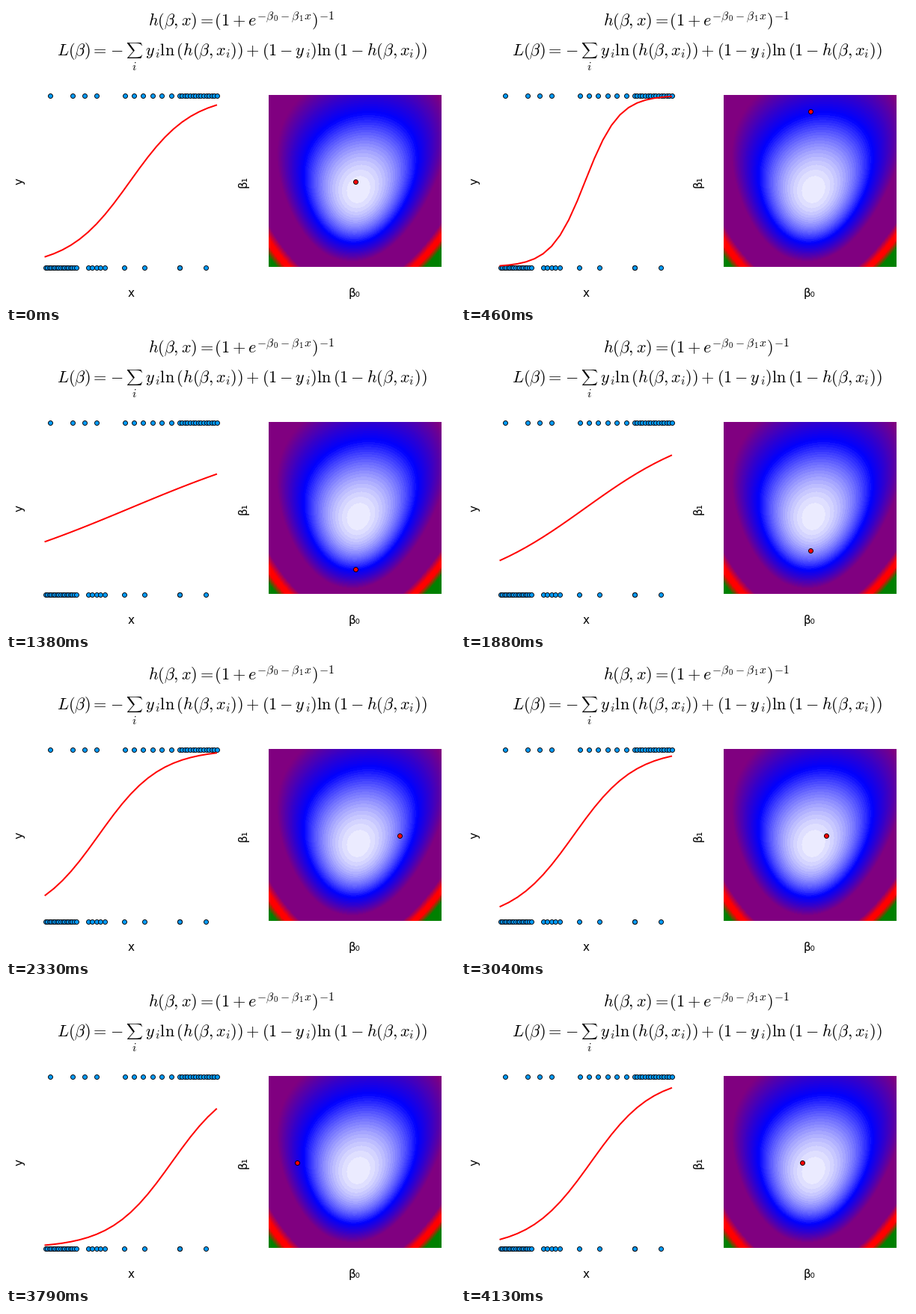
Animation of 600 by 400 pixels, one loop 4.18 s. Source, as a matplotlib script:

```python
import numpy as np
import matplotlib.pyplot as plt
from matplotlib.animation import FuncAnimation

W, H, DPI = 600, 400, 100
LOOP, TICK, FPS, STEPS = 4180, 20, 24, 100
PT = 72 / DPI  # points per pixel

# Left panel: y = 1 at TOP, y = 0 at BOTTOM
TOP, BOTTOM = 119.5, 349
X_LEFT, X_RIGHT, X_ZERO, X_SPAN = 52.5, 281, 166, 229

# Right panel: intercept across, slope upwards
HEAT = (351, 582, 349, 119)
MID_X, MID_Y = 466.4, 234.3
PX_PER_B0 = 57.5
SLOPE = 5.58
PX_PER_SLOPE = 115 / SLOPE
SWING_X, SWING_Y = 86.2, 95.6


def spread(*knots):
    """Evenly spaced samples between (rank, x) knots."""
    rank, x = zip(*knots)
    return np.interp(np.arange(rank[-1] + 1), rank, x)


# The classes thin out towards each other's side
ones = spread((0, 58), (1, 88), (3, 120), (4, 158), (9, 220), (10, 231),
              (24, 281.5))
zeros = spread((0, 52), (16, 93), (17, 109), (21, 131.5), (23, 184),
               (24, 231), (25, 231), (26, 266))


def feature(px):
    return (px - X_ZERO) / X_SPAN


def betas(px, py):
    return (px - MID_X) / PX_PER_B0, SLOPE - (py - MID_Y) / PX_PER_SLOPE


def loss_map():
    left, right, bottom, top = HEAT
    b0, b1 = betas(*np.meshgrid(np.arange(left, right) + 0.5,
                                np.arange(top, bottom) + 0.5))
    total = sum(np.logaddexp(0, -b0 - b1 * v) for v in feature(ones))
    total = total + sum(np.logaddexp(0, b0 + b1 * v) for v in feature(zeros))
    return total / (len(ones) + len(zeros))


def colourise(loss, band=0.005):
    level = (np.floor((loss - loss.min()) / band) + 0.5) * band
    pale, blue, purple = (241, 241, 255), (0, 0, 255), (128, 0, 128)
    red, green = (255, 0, 0), (0, 128, 0)
    stops = [0, 0.105, 0.21, 0.41, 0.475, 0.515, 0.58]
    rgb = np.array([pale, blue, purple, purple, red, red, green]) / 255
    return np.dstack([np.interp(level, stops, c) for c in rgb.T])


fig = plt.figure(figsize=(W / DPI, H / DPI), dpi=DPI, facecolor="white")
ax = fig.add_axes([0, 0, 1, 1])
ax.imshow(colourise(loss_map()), extent=HEAT, aspect="auto",
          interpolation="nearest")
ax.set(xlim=(0, W), ylim=(H, 0))
ax.axis("off")


def pixel(v):
    return np.floor(v) + 0.5


def dots(xs, y, colour, z):
    return ax.scatter(pixel(xs), np.full(len(xs), pixel(y)), s=(6 * PT) ** 2,
                      c=colour, edgecolors="black", linewidths=0.9 * PT,
                      zorder=z)


def label(x, y, text, turn=0):
    ax.text(x, y, text, size=11, family="DejaVu Sans", rotation=turn,
            rotation_mode="anchor", ha="center", va="baseline")


def formula(x, y, text, ha="center", va="baseline", size=16):
    ax.text(x, y, f"${text}$", size=size, math_fontfamily="cm", ha=ha, va=va)


formula(314.5, 27, r"h(\beta,x)=\hspace{-0.1}"
                   r"(1+e^{-\beta_{\,0}-\beta_{\,1}x})^{-1}")
formula(68, 66.3, r"L(\beta)=\hspace{-0.1}-", ha="left")
formula(172, 59, r"\sum", va="center", size=11)
formula(171.5, 86, "i", size=11)
formula(563, 66.3, r"y_{\,i}\ln{}(h(\beta,x_i))"
                   r"+(1-y_{\,i})\ln{}(1-h(\beta,x_i))", ha="right")
label(167, 389, "x")
label(23, 234.8, "y", 90)
label(466, 389, "β₀")
label(322, 234.8, "β₁", 90)

dots(ones, TOP, "#009afa", 3)
dots(zeros, BOTTOM, "#009afa", 3)
line_x = np.linspace(X_LEFT, X_RIGHT, 21)
curve, = ax.plot(line_x, line_x, color="red", lw=2 * PT, zorder=4,
                 solid_capstyle="projecting")
marker = dots(np.array([MID_X]), MID_Y, "red", 5)


def update(i):
    # The pose advances at 24 steps per second, held between steps
    step = min(int((i * TICK + 15) * FPS / 1000), STEPS - 1)
    swing = np.sin(2 * np.pi * step / 50)
    px, py = MID_X, MID_Y
    if step < 50:
        py -= SWING_Y * swing
    else:
        px += SWING_X * swing
    b0, b1 = betas(px, py)
    p = 1 / (1 + np.exp(-b0 - b1 * feature(line_x)))
    curve.set_ydata(BOTTOM + (TOP - BOTTOM) * p)
    marker.set_offsets([[pixel(px), pixel(py)]])
    return curve, marker


anim = FuncAnimation(fig, update, frames=LOOP // TICK, interval=TICK,
                     repeat=True, repeat_delay=0, blit=False)
plt.show()
```
